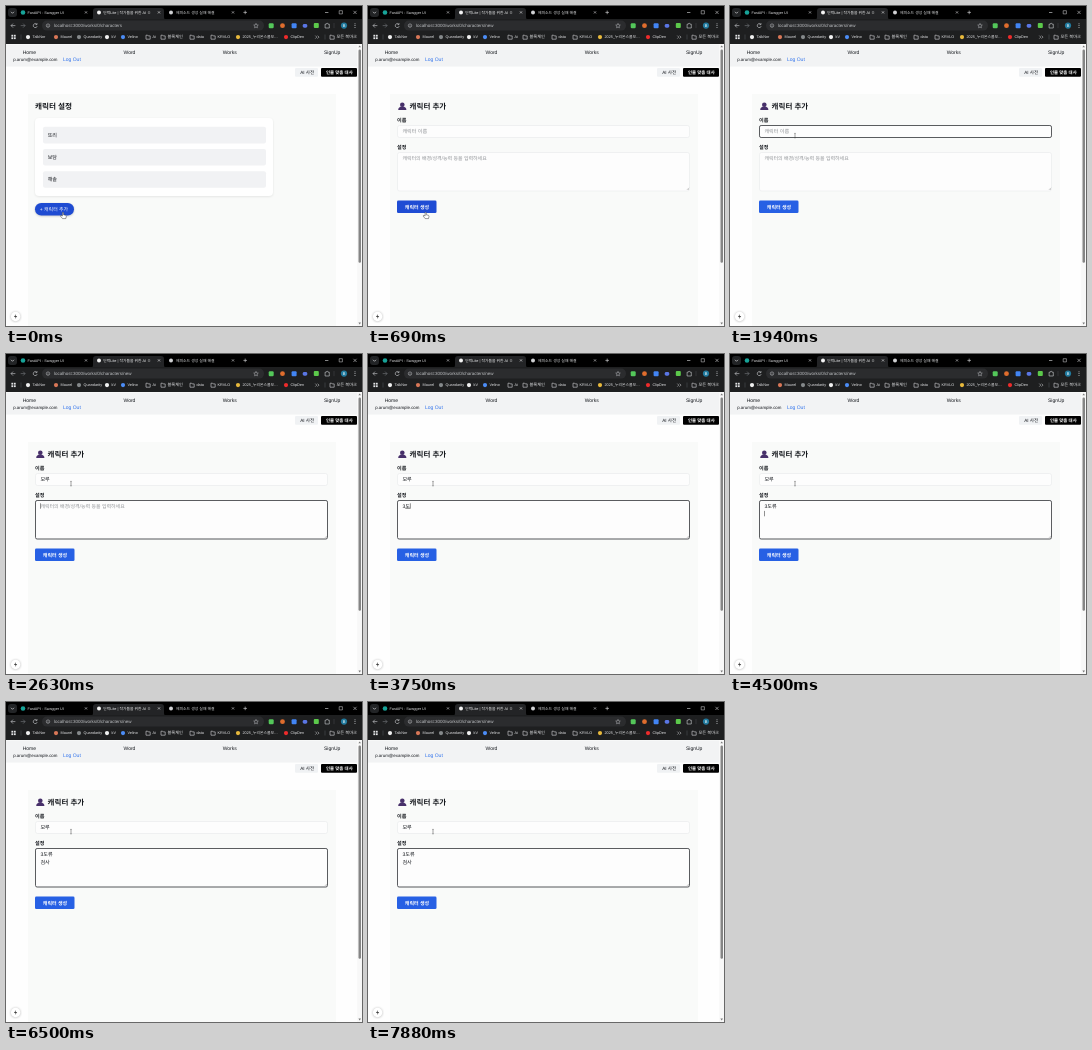
An HTML page that plays this animation: 356x320 px, repeating every 8000 ms.

```html
<!DOCTYPE html>
<html lang="ko">
<head>
<meta charset="utf-8">
<title>캐릭터 추가</title>
<style>
  html, body { margin: 0; width: 100%; height: 100%; overflow: hidden; background: #fff; }
  svg { display: block; width: 356px; height: 320px; }
  text {
    font-family: "Liberation Sans", "Noto Sans CJK KR", "Noto Sans CJK", sans-serif;
    text-rendering: geometricPrecision;
    white-space: pre;
  }
</style>
</head>
<body>
<svg id="stage" viewBox="0 0 356 320" xmlns="http://www.w3.org/2000/svg"></svg>
<script>
const LOOP = 8000, BLINK = 530;
const INK = '#15181d', HINT = '#8f9296', BLUE = [39, 96, 228], NAVY = [31, 76, 212];

// Drawing helpers
const rect = (x, y, w, h, fill, r = 0, more = '') =>
  `<rect x="${x}" y="${y}" width="${w}" height="${h}" rx="${r}" fill="${fill}" ${more}/>`;
const dot = (x, y, r, fill, more = '') => `<circle cx="${x}" cy="${y}" r="${r}" fill="${fill}" ${more}/>`;
const line = (d, stroke, w = 0.6, more = '') =>
  `<path d="${d}" fill="none" stroke="${stroke}" stroke-width="${w}" ${more}/>`;
const text = (x, y, size, str, fill = INK, weight = 400, more = '') =>
  `<text x="${x}" y="${y}" font-size="${size}" fill="${fill}" font-weight="${weight}" ${more}>${str}</text>`;
const group = (id, body) => `<g id="${id}">${body}</g>`;
const cross = (x, y, s, c) => line(`M${x - s} ${y - s}l${2 * s} ${2 * s}m0 ${-2 * s}l${-2 * s} ${2 * s}`, c, 0.55);
const folder = x => line(`M${x - 2} 29.2h1.6l.6.7h2v3.3h-4.2z`, '#d5d6d8', 0.6);

function tabs() {
  const c = '#dedfe1';
  return rect(0, 0, 356, 14, '#000') +
    rect(2, 2, 9, 9, '#222426', 3) + line('M5 5.8l1.5 1.5 1.5-1.5', c, 0.7) +
    dot(17, 6.5, 2.3, '#17a398') + text(21.5, 8, 3.75, 'FastAPI - Swagger UI', c) + cross(80, 6.4, 1.1, c) +
    `<path d="M84 14q3 0 3-3V5q0-3 3-3h65q3 0 3 3v6q0 3 3 3z" fill="#232426"/>` +
    dot(93, 6.5, 2, '#f4f4f4') + text(97.3, 8, 3.8, '단락Lite | 작가들을 위한 AI ㅁ', '#f0f1f2') + cross(153, 6.4, 1.1, '#f0f1f2') +
    dot(165, 6.5, 2, '#d0d1d3') + text(170, 8, 3.85, '에피소드 생성 실패 해결', c) + cross(227, 6.4, 1.1, c) +
    line('M237.4 6.4h3.6m-1.8-1.8v3.6', c) +
    line('M319 6.5h3.4', c) + line('M333.2 4.7h3.2v3.2h-3.2z', c, 0.5) + cross(349, 6.4, 1.6, c);
}

function toolbar() {
  const c = '#cfd1d4';
  return rect(0, 13, 356, 25.5, '#1e1f20') +
    line('M9.4 19.6H5m2-2l-2 2 2 2', c) + line('M14.7 19.6h4.4m-2-2l2 2-2 2', '#777b80') +
    line('M30.7 18.2a2 2 0 1 0 .5 1.9m-.2-3v1.5h-1.5', c) +
    rect(36, 14.6, 222, 10, '#2b2c2e', 5) +
    dot(42, 19.6, 1.7, 'none', `stroke="${c}" stroke-width=".5"`) + line('M42 19.3v1.3', c, 0.5) +
    text(48, 21.2, 4.5, '', '#bfc1c4', 400, 'id="url"') +
    line('M250 17.4l.7 1.5 1.6.2-1.2 1.1.3 1.6-1.4-.8-1.4.8.3-1.6-1.2-1.1 1.6-.2z', c, 0.45) +
    rect(262.7, 17.2, 5, 5, '#54c75a', 1.2) + dot(276.5, 19.7, 2.4, '#df6d2d') +
    rect(285.6, 17.2, 5, 5, '#4285f4', 1) + rect(296.8, 17.9, 4.4, 3.8, '#5a76e4', 1.4) +
    rect(307.8, 17.1, 5, 5, '#5cc94b', 1) +
    line('M319.1 18.2h1.2a.9.9 0 0 1 1.8 0h1.2v3.8h-4.2z', c) + line('M328 17v5.2', '#55585c', 0.4) +
    dot(338, 19.6, 3.1, '#217a9e') + text(336.7, 21.1, 4, 'B', '#fff') +
    [17.8, 19.6, 21.4].map(y => dot(349, y, 0.5, c)).join('');
}

function bookmarks() {
  const c = '#e3e4e6', y = 32.4;
  const sites = [
    [22, '#f0f0f0', 'TalkNor'], [50, '#d97757', 'Maurel'], [73, '#85898b', 'Quandarity'],
    [101, '#f1f1f1', 'kV'], [117, '#4c8df6', 'Velino'], [232, '#e8b93c', '2025_누리온스쿨모…'], [280, '#ee2b2b', 'ClipDen']
  ];
  const dirs = [[142, 'Ai'], [157, '블록체인'], [186, 'data'], [207, 'KRVLO'], [326, '모든 북마크']];
  const grid = [0, 1, 2, 3].map(i => rect(5.4 + (i % 2) * 2.5, 28.8 + (i >> 1) * 2.5, 1.8, 1.8, c)).join('');
  return grid + line('M15 28.5v5M319 28.5v5', '#55585c', 0.5) +
    sites.map(([x, f, s]) => dot(x, 31.1, 2.1, f) + text(x + 4.5, y, 3.8, s, c)).join('') +
    dirs.map(([x, s]) => folder(x) + text(x + 4.5, y, x > 300 || x === 157 ? 4.2 : 3.8, s, c)).join('') +
    line('M309.3 29.6l1.5 1.5-1.5 1.5m2.2-3l1.5 1.5-1.5 1.5', c, 0.5);
}

function shell() {
  return rect(0, 38, 356, 282, '#fefefe') + rect(0, 38.5, 351, 22, '#f2f3f4') +
    [[16.7, 'Home'], [117.5, 'Word'], [216.7, 'Works'], [318, 'SignUp']].map(([x, s]) => text(x, 48, 5, s)).join('') +
    text(7.2, 55.2, 4.4, 'p.arum@example.com') + text(57, 55.4, 5, 'Log Out', '#2f72ec') +
    rect(289, 62, 23, 8.7, '#f0f2f4', 1) + text(294.2, 68.1, 4.6, 'AI 사전', INK, 500) +
    rect(315, 62, 36, 8.7, '#000', 1) + text(320, 68.1, 4.4, '인물 맞춤 대사', '#fff', 700) +
    rect(22, 88, 308, 232, '#f9faf9') +
    rect(351.2, 38.5, 4.8, 281.5, '#f8f8f8') + rect(352.5, 43.5, 2.5, 213.3, '#858585', 1.2) +
    `<path d="M352.4 41.3h2.6l-1.3-1.8zM352.4 316.6h2.6l-1.3 1.8z" fill="#777"/>` +
    dot(9.6, 310.8, 5, '#000', 'opacity=".22" filter="url(#soft)"') + dot(9.6, 310.5, 4.7, '#fff') +
    `<path d="M10.1 307.9l-2.2 3h1.6l-.5 2.2 2.2-3h-1.6z" fill="#444"/>`;
}

function listPage() {
  return text(29, 103, 7.6, '캐릭터 설정', INK, 700) +
    rect(29, 112.8, 238, 78, '#000', 4, 'opacity=".09" filter="url(#soft)"') + rect(29, 112, 238, 78, '#fff', 4) +
    ['또리', '보담', '해솔'].map((s, i) =>
      rect(37, 120.8 + i * 22.2, 223, 16.6, '#f1f2f4', 2) + text(41.7, 131 + i * 22.2, 5.1, s, INK, 500)).join('') +
    rect(29, 197.8, 39, 12.4, '#000', 6.2, 'opacity=".2" filter="url(#soft)"') +
    rect(29, 197, 39, 12.5, '#1f4bd2', 6.2) + text(33.8, 205.1, 4.95, '+ 캐릭터 추가', '#fff', 500);
}

function formPage() {
  const field = (id, y, h) => rect(29.5, y, 292, h, '#fdfdfd', 2, 'stroke="#e8eaeb" stroke-width=".6"') +
    rect(29.5, y, 292, h, 'none', 1.6, `id="${id}" stroke="#5a5c5f" stroke-width="1"`);
  return dot(34.3, 98.7, 2.3, '#47306a') + `<path d="M30.2 104.1q0-3.7 4.1-3.7t4.1 3.7z" fill="#47306a"/>` +
    text(41.6, 103, 7.5, '캐릭터 추가', INK, 700) +
    text(29, 115.8, 5.1, '이름', INK, 700) + field('ring0', 119.5, 12) +
    text(34.4, 127.4, 5.1, '캐릭터 이름', HINT, 400, 'id="hint0"') + text(34.4, 127.4, 5.1, '', INK, 500, 'id="name"') +
    text(29, 142.5, 5.1, '설정', INK, 700) + field('ring1', 146.5, 38.5) +
    text(34.4, 153.9, 4.97, '캐릭터의 배경/성격/능력 등을 입력하세요', HINT, 400, 'id="hint1"') +
    text(34.4, 153.9, 5.1, '', INK, 500, 'id="row0"') + text(34.4, 161.5, 5.1, '', INK, 500, 'id="row1"') +
    line('M319 183.8l2-2m-.8 2l.8-.8', '#777', 0.4) +
    rect(29, 194.6, 39.5, 12.4, '#2760e4', 1.3, 'id="save"') + text(36.8, 202.7, 5, '캐릭터 생성', '#fff', 700) +
    rect(0, 0, 0.5, 5.4, '#222', 0, 'id="caret"') + rect(0, 0, 4.7, 0.5, '#333', 0, 'id="compose"');
}

const pointers =
  group('hand', `<path d="M-.6 0q.6-.7 1.2 0v2.2l2 .5q.8.3.7 1.1l-.5 2.2h-3.3l-2-2.5q0-.8.8-.7l1.1.6z" fill="#fff" stroke="#222" stroke-width=".45"/>`) +
  group('arrow', `<path d="M0 0v5.4l1.3-1.2.9 2 .8-.4-.9-1.9h1.8z" fill="#fff" stroke="#222" stroke-width=".4"/>`) +
  group('beam', line('M-.9-2.2q.7 0 .9.4q.2-.4.9-.4M0-1.8v3.6M-.9 2.2q.7 0 .9-.4q.2.4.9.4', '#444', 0.5));

document.getElementById('stage').innerHTML =
  `<filter id="soft"><feGaussianBlur stdDeviation="1.1"/></filter>` +
  tabs() + toolbar() + bookmarks() + shell() +
  group('list', listPage()) + group('form', formPage()) + group('pointer', pointers);

// Time table: [start, name, first row, second row (null = no line break yet)]
const steps = [
  [0, '', '', null],
  [2130, 'ㅁ', '', null], [2250, '모', '', null], [2310, '몰', '', null], [2440, '모루', '', null],
  [2940, '모루', '3', null], [3440, '모루', '3ㄷ', null], [3560, '모루', '3도', null],
  [3810, '모루', '3돌', null], [4000, '모루', '3도류', null], [4500, '모루', '3도류', ''],
  [5250, '모루', '3도류', 'ㄱ'], [5380, '모루', '3도류', '거'], [5560, '모루', '3도류', '검'],
  [5690, '모루', '3도류', '검ㅅ'], [5940, '모루', '3도류', '검사']
];
const OPEN = 690, FOCUS = 1400, TAB = 2500;

const el = id => document.getElementById(id);
const show = (id, on) => el(id).setAttribute('visibility', on ? 'inherit' : 'hidden');
const place = (id, x, y) => { el(id).setAttribute('x', x); el(id).setAttribute('y', y); };
const ramp = (t, a, b) => Math.min(1, Math.max(0, (t - a) / (b - a)));
const ease = p => p < 0.5 ? 4 * p ** 3 : 1 - (2 - 2 * p) ** 3 / 2;
const write = (id, str) => { if (el(id).textContent !== str) el(id).textContent = str; };

function drawPointer(t) {
  const p = ease(ramp(t, 880, 1390));
  const x = (t < 60 ? 57 : 57.7) + 7.3 * p, y = 206.6 - 77 * p;
  const kind = y > 194 ? 'hand' : y > 185 ? 'arrow' : 'beam';
  ['hand', 'arrow', 'beam'].forEach(k => show(k, k === kind));
  el('pointer').setAttribute('transform', `translate(${x} ${y})`);
}

// The syllable being typed is underlined while the caret is lit
function drawCaret(t, since, row1) {
  const last = Math.max(since, t >= TAB ? TAB : FOCUS);
  const [id, y] = t < TAB ? ['name', 122.9] : row1 === null ? ['row0', 149.3] : ['row1', 156.9];
  const str = el(id).textContent;
  const x = 34.4 + (str ? el(id).getComputedTextLength() : 0);
  const lit = t >= FOCUS && Math.floor((t - last) / BLINK) % 2 === 0;
  show('caret', lit);
  show('compose', lit && /[ㄱ-힣]$/.test(str));
  place('caret', x, y);
  place('compose', x - 4.7, y + 5.2);
}

function draw(t) {
  const inForm = t >= OPEN;
  el('list').style.display = inForm ? 'none' : '';
  el('form').style.display = inForm ? '' : 'none';
  write('url', 'localhost:3000/works/0/characters' + (inForm ? '/new' : ''));
  drawPointer(t);
  if (!inForm) return;

  const [since, name, row0, row1] = steps.filter(s => s[0] <= t).pop();
  write('name', name);
  write('row0', row0);
  write('row1', row1 || '');
  show('hint0', !name);
  show('hint1', !row0);

  const moved = ramp(t, TAB, TAB + 110);
  el('ring0').setAttribute('opacity', ramp(t, FOCUS - 20, FOCUS + 40) * (1 - moved));
  el('ring1').setAttribute('opacity', moved);
  const q = ramp(t, 1250, 1500);
  el('save').setAttribute('fill', `rgb(${NAVY.map((v, i) => Math.round(v + (BLUE[i] - v) * q))})`);
  drawCaret(t, since, row1);
}

const begin = performance.now();
function tick() {
  draw((performance.now() - begin) % LOOP);
  requestAnimationFrame(tick);
}
tick();
</script>
</body>
</html>
```
